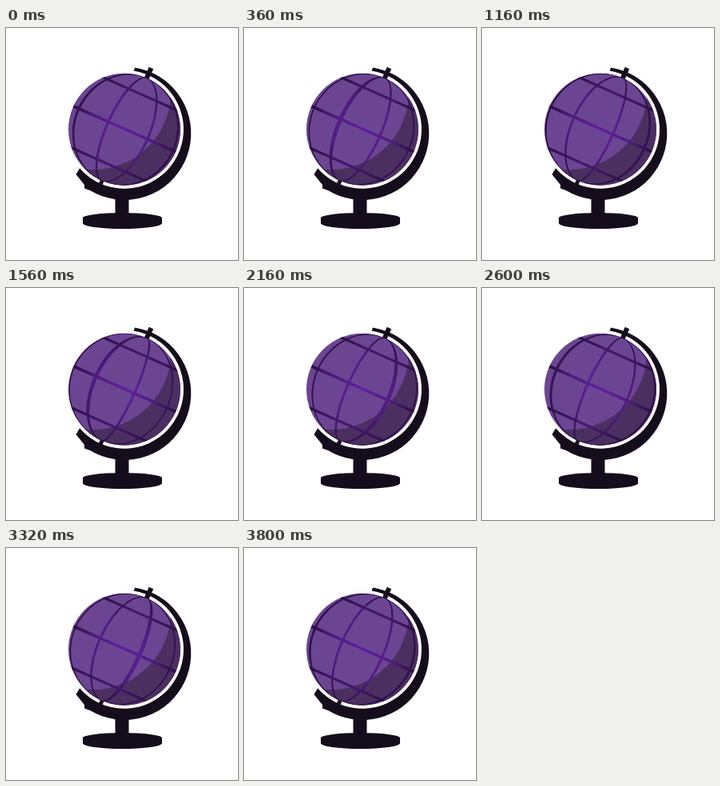
Recreate the animation shown at these times as an HTML page with a canvas. Size 290 by 290 pixels, loop 3840 ms.

```html
<!DOCTYPE html>
<html lang="en">
<head>
<meta charset="utf-8">
<title>Spinning globe</title>
<style>
  html, body { margin: 0; width: 100%; height: 100%; overflow: hidden; background: #fff; }
  canvas { display: block; width: 290px; height: 290px; }
</style>
</head>
<body>
<canvas id="stage"></canvas>
<script>
const SIZE = 290, LOOP = 3840, STEP = 40;
const CX = 148, CY = 126.7, R = 70;
const TILT = 24 * Math.PI / 180;
const SPACING = 45, LINES_PER_LOOP = 9;
const DARK = '#150d1b';
const canvas = document.getElementById('stage');
const ctx = canvas.getContext('2d');
const scale = window.devicePixelRatio || 1;
canvas.width = canvas.height = SIZE * scale;

const rad = deg => deg * Math.PI / 180;

function disc(x, y, r, color) {
  ctx.beginPath();
  ctx.arc(x, y, r, 0, Math.PI * 2);
  ctx.fillStyle = color;
  ctx.fill();
}

function line(x1, y1, x2, y2, width, color) {
  ctx.beginPath();
  ctx.moveTo(x1, y1);
  ctx.lineTo(x2, y2);
  ctx.lineWidth = width;
  ctx.strokeStyle = color;
  ctx.stroke();
}

function drawStand() {
  // Crescent between two offset circles, with a notched lower end
  ctx.fillStyle = DARK;
  ctx.beginPath();
  ctx.arc(CX, CY, 74, rad(-81), rad(139));
  ctx.lineTo(87.5, 183);
  ctx.lineTo(98, 196);
  ctx.lineTo(98, 200.5);
  ctx.arc(148, 131.7, 83.3, rad(121), rad(-81), true);
  ctx.closePath();
  ctx.fill();

  ctx.fillRect(136.5, 211, 17, 24);
  ctx.beginPath();
  ctx.ellipse(145.5, 237.5, 49.5, 6.5, 0, Math.PI, 0);
  ctx.ellipse(145.5, 244, 49.5, 7, 0, 0, Math.PI);
  ctx.closePath();
  ctx.fill();
  line(181.5, 50, 175.5, 63.5, 6, DARK);
  line(121, 189, 116, 200, 5, DARK);
}

function meridian(lon, halfWidth, color) {
  const edge = (offset, from, to) => {
    const reach = R * Math.sin(rad(lon + offset));
    for (let i = 0; i <= 40; i++) {
      const lat = from + (to - from) * i / 40;
      ctx.lineTo(reach * Math.cos(lat), -R * Math.sin(lat));
    }
  };
  ctx.beginPath();
  edge(-halfWidth, -Math.PI / 2, Math.PI / 2);
  edge(halfWidth, Math.PI / 2, -Math.PI / 2);
  ctx.closePath();
  ctx.fillStyle = ctx.strokeStyle = color;
  ctx.lineWidth = 1;
  ctx.fill();
  ctx.stroke();
}

function drawGlobe(t) {
  disc(CX, CY, R, '#6b4592');
  ctx.save();
  ctx.beginPath();
  ctx.arc(CX, CY, R, 0, Math.PI * 2);
  ctx.clip();

  ctx.beginPath();
  ctx.rect(0, 0, SIZE, SIZE);
  ctx.arc(109, 80, 97, 0, Math.PI * 2, true);
  ctx.fillStyle = '#4b2f61';
  ctx.fill('evenodd');

  ctx.translate(CX, CY);
  ctx.rotate(TILT);
  const ink = ctx.createRadialGradient(0, 0, 0, 0, 0, R);
  ink.addColorStop(0, '#6322a2');
  ink.addColorStop(0.55, '#4f1c80');
  ink.addColorStop(1, '#2a0f42');

  const turn = 26.5 + SPACING * LINES_PER_LOOP * t / LOOP;
  for (let k = -1; k <= 11; k++) {
    const lon = turn - SPACING * k;
    const bold = (k + 3) % 3 === 2;
    if (Math.abs(lon) < 88) meridian(lon, bold ? 1.8 : 0.9, ink);
  }
  line(-R, -48.5, R, -48.5, 3.2, ink);
  line(-R, -0.6, R, -0.6, 3.8, ink);
  line(-R, 48, R, 48, 3.2, ink);
  ctx.restore();
}

function draw(now) {
  const t = Math.floor(now % LOOP / STEP) * STEP;
  ctx.setTransform(scale, 0, 0, scale, 0, 0);
  ctx.fillStyle = '#fff';
  ctx.fillRect(0, 0, SIZE, SIZE);
  drawStand();
  drawGlobe(t);
}

let start;
function tick(now) {
  start ??= now;
  draw(now - start);
  requestAnimationFrame(tick);
}
draw(0);
requestAnimationFrame(tick);
</script>
</body>
</html>
```
